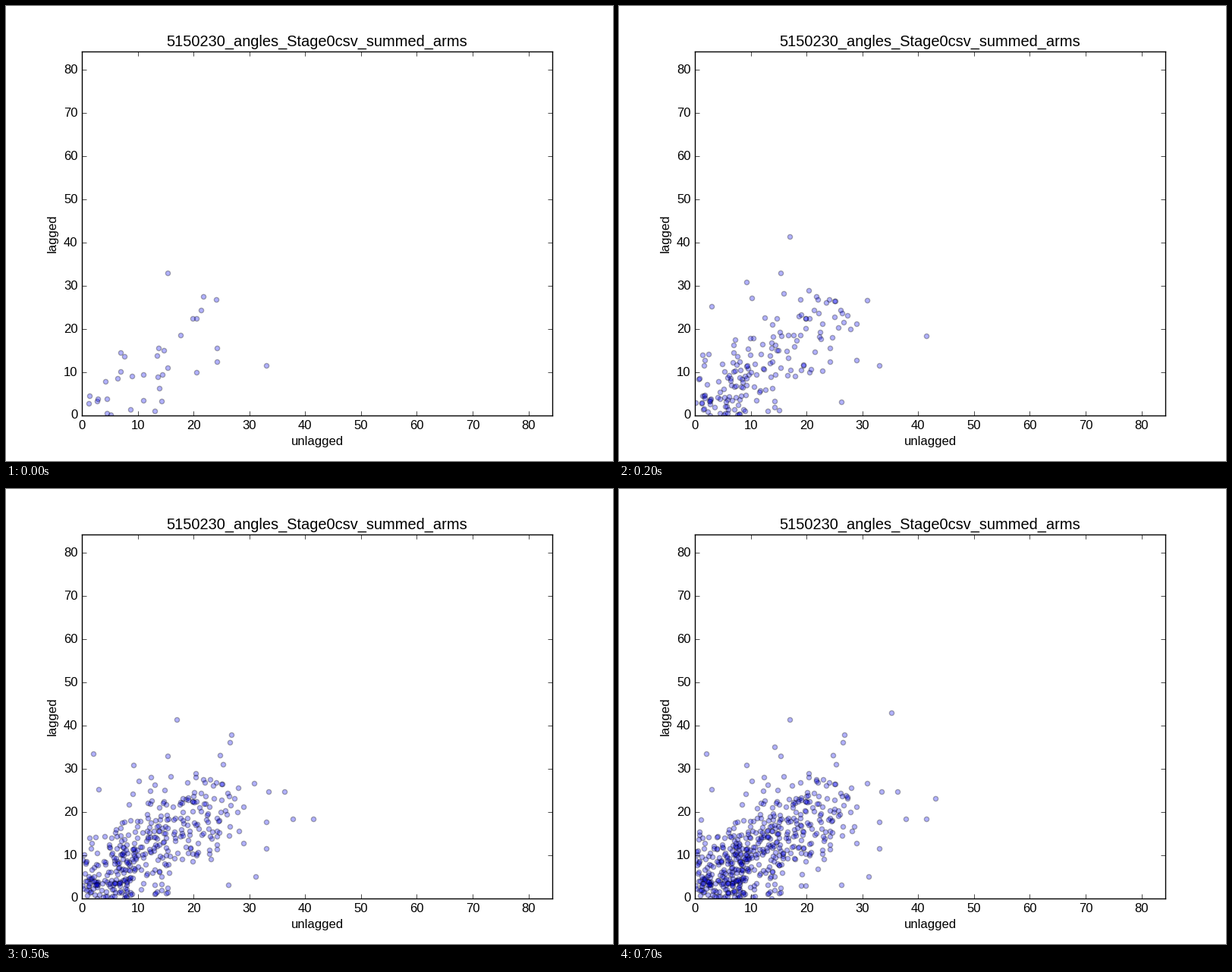
Write a matplotlib script that moves like this. It is 800x600 px and loops after 750 ms.

```python
import matplotlib.pyplot as plt
import numpy as np
from matplotlib.animation import FuncAnimation

FRAMES = 15
INTERVAL = 50
PER_FRAME = 36
LIMIT = 84.28

plt.rcParams.update({
    "font.family": "Liberation Sans",
    "font.size": 12,
    "axes.titlesize": 14.4,
    "axes.titlepad": 5,
    "axes.labelpad": 5,
    "axes.linewidth": 1,
    "ytick.alignment": "center",
})
for axis in ("xtick", "ytick"):
    plt.rcParams.update({
        f"{axis}.direction": "in",
        f"{axis}.major.size": 4,
        f"{axis}.major.width": 0.5,
        f"{axis}.major.pad": 4,
    })

# The widest swings by step: each pair of successive readings is one point.
SWINGS = {
    0: [15.4, 33, 11.6],
    1: [3, 25.2, 26.5],
    2: [9.25, 30.85, 26.65],
    3: [17, 41.4, 18.4],
    5: [2.05, 33.45, 24.7],
    6: [25.25, 31.1, 5.1],
    7: [26.5, 36.25, 24.75, 33.1, 17.8],
    9: [12.4, 28.1, 15.65],
    10: [26.75, 37.85, 18.5],
    11: [14.25, 35.2, 43.1, 23.2],
}


def cloud(rng, count):
    """Points strewn about the diagonal, denser towards the origin."""
    points = []
    while len(points) < count:
        level = 4 + 21 * rng.random() ** 1.8
        x, y = np.abs(level + rng.normal(0, 5, 2))
        if max(x, y) < 29.5:
            points.append((x, y))
    return points


rng = np.random.default_rng(12)
points = []
totals = []
for step in range(FRAMES):
    run = SWINGS.get(step, [])
    swings = list(zip(run, run[1:]))
    points += cloud(rng, PER_FRAME - len(swings)) + swings
    totals.append(len(points))
points = np.array(points)

fig = plt.figure(figsize=(8, 6), dpi=100, facecolor="white")
ax = fig.add_axes([0.125, 0.1, 0.775, 0.8])
ax.set(xlim=(0, LIMIT), ylim=(0, LIMIT),
       xticks=range(0, 90, 10), yticks=range(0, 90, 10),
       xlabel="unlagged", ylabel="lagged",
       title="5150230_angles_Stage0csv_summed_arms")
ax.tick_params(top=True, right=True)
dots = ax.scatter(points[:, 0], points[:, 1], s=20, c="blue",
                  edgecolors="black", linewidths=1, alpha=0.3)


def update(frame):
    dots.set_offsets(points[:totals[frame]])
    return (dots,)


anim = FuncAnimation(fig, update, frames=FRAMES, interval=INTERVAL,
                     repeat=True, repeat_delay=0, blit=False)
plt.show()
```
